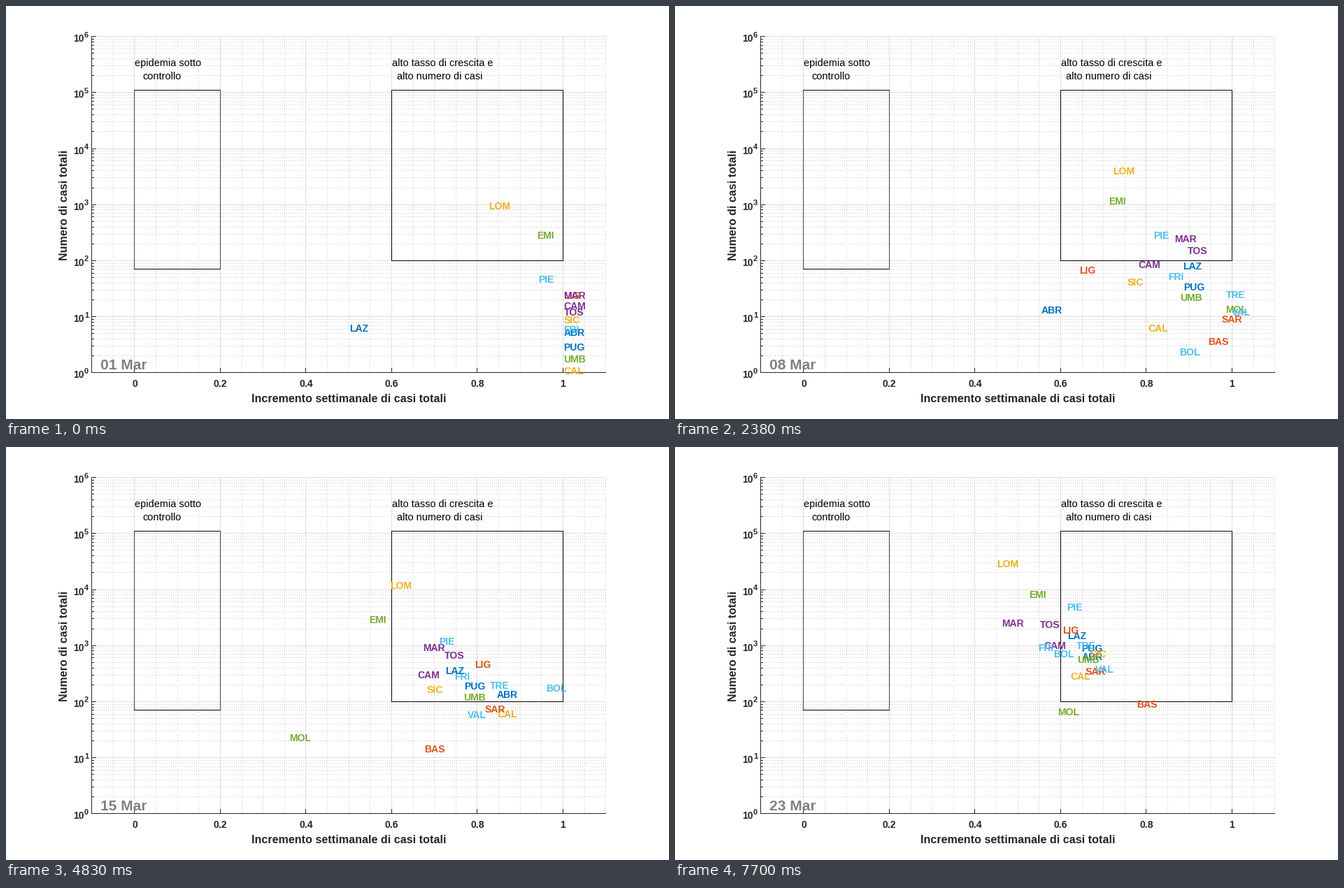
Recreate the animation shown at these times as a matplotlib script. Size 948 by 591 pixels, loop 8 s.

```python
import numpy as np
import matplotlib.pyplot as plt
from matplotlib.animation import FuncAnimation
from matplotlib.collections import LineCollection

W, H, DPI = 948, 591, 64
PX = 72 / DPI               # points per pixel
INTERVAL, LOOP = 20, 8000
STEP_MS, LAST_STEP = 70, 110
STEPS_PER_DAY = 5
LAG = 6 * STEPS_PER_DAY     # window of the growth rate

LEFT, RIGHT, TOP, BOTTOM = 122.7, 857.7, 43.6, 524.8
DECADE = (BOTTOM - TOP) / 6

BLUE, ORANGE, YELLOW = "#0072BD", "#D95319", "#EDB120"
PURPLE, GREEN, SKY = "#7E2F8E", "#77AC30", "#4DBEEE"
DARK = "#262626"

plt.rcParams["font.family"] = "Liberation Sans"

fig = plt.figure(figsize=(W / DPI, H / DPI), dpi=DPI, facecolor="white")
ax = fig.add_axes([0, 0, 1, 1])
ax.set_xlim(0, W)
ax.set_ylim(H, 0)
ax.axis("off")


def px_x(v):
    return 183.9 + 612.5 * v


def px_y(v):
    return BOTTOM - DECADE * np.log10(v)


def lines(segs, color, z=1, dotted=False):
    """One-pixel lines through pixel centres."""
    ax.add_collection(LineCollection(
        np.floor(segs) + 0.5, colors=color, linewidths=PX, zorder=z,
        linestyles=(0.5, (1, 2)) if dotted else "solid",
        capstyle="butt" if dotted else "projecting", snap=False))


def write(x, y, s, size=14, color=DARK, weight="bold", **kw):
    return ax.text(x, y, s, fontsize=size * PX, color=color, weight=weight,
                   va="baseline", **kw)


def vline(x, y0=TOP, y1=BOTTOM):
    return [(x, y0), (x, y1)]


def hline(y, x0=LEFT, x1=RIGHT):
    return [(x0, y), (x1, y)]


def draw_axes():
    major_x = [px_x(0.2 * k) for k in range(6)]
    minor_x = [px_x(0.05 * k) for k in range(-1, 23) if k % 4]
    major_y = [px_y(10.0 ** k) for k in range(7)]
    minor_y = [px_y(m * 10.0 ** k) for k in range(6) for m in range(2, 10)]

    lines([vline(x) for x in minor_x] + [hline(y) for y in minor_y],
          "#c9c9c9", dotted=True)
    lines([vline(x) for x in major_x] + [hline(y) for y in major_y[1:]],
          "#dedede", 2)

    ticks = [vline(x, BOTTOM - 6, BOTTOM) for x in major_x]
    ticks += [hline(y, LEFT, LEFT + 6) for y in major_y]
    ticks += [hline(y, LEFT, LEFT + 3) for y in minor_y]
    lines(ticks + [vline(LEFT), hline(BOTTOM)], DARK, 3)

    for k, x in enumerate(major_x):
        write(x, 545, f"{0.2 * k:.1g}", ha="center")
    for k, y in enumerate(major_y):
        write(96.5, y + 7.5, "10")
        write(112, y + 1, str(k), 11)
    write(490, 567, "Incremento settimanale di casi totali", 16.1, ha="center")
    write(88.5, 285, "Numero di casi totali", 16, ha="center", rotation=90,
          rotation_mode="anchor")


def draw_zone(v0, v1, y0, y1, side):
    x0, x1 = px_x(v0), px_x(v1)
    lines([vline(x0, y0, y1), vline(x1, y0, y1)], side, 4)
    lines([hline(y0, x0, x1), hline(y1, x0, x1)], "black", 4)


def note(x, y, s):
    write(x, y, s, 14.5, "black", "normal")


draw_axes()
draw_zone(0, 0.2, px_y(1.1e5), px_y(70), "#444444")
draw_zone(0.6, 1, px_y(1.1e5), px_y(100), "black")
note(184.5, 86, "epidemia sotto")
note(195.5, 105, "controllo")
note(552.5, 86, "alto tasso di crescita e")
note(559, 105, "alto numero di casi")
date = write(135, 519.5, "01 Mar", 21, "#808080", zorder=5)

KEYS = (0, 17, 34, 49, 82, 110)


class Region:
    """Heights at the key steps give the cases; growth follows from them."""

    def __init__(self, name, color, growth, *heights, first=1):
        self.label = write(0, 0, name, 14, color, zorder=6)
        self.heights = heights
        self.early = (first, growth, self.rate(LAG))

    def height(self, step):
        return np.interp(step, KEYS, self.heights)

    def rate(self, step):
        return 1 - 10 ** ((self.height(step) - self.height(step - LAG)) / DECADE)

    def place(self, step):
        y = self.height(step)
        v = (self.rate(step) if step > LAG
             else np.interp(step, (0, KEYS[1], LAG), self.early))
        self.label.set_position((px_x(v) + 1, y + 5))
        self.label.set_visible(y < BOTTOM)      # at least one case


regions = [
    Region("ABR", BLUE, .88, 467, 450, 435, 387, 333, 300),
    Region("BAS", ORANGE, 1, 600, 514, 480, 454, 418, 368),
    Region("CAL", YELLOW, .81, 522, 503, 461, 420, 358, 328),
    Region("CAM", PURPLE, .905, 429, 402, 370, 351, 310, 284),
    Region("EMI", GREEN, .81, 328, 303, 279, 266, 235, 211, first=.937),
    Region("FRI", SKY, 1, 463, 420, 387, 353, 312, 287),
    Region("LAZ", BLUE, .92, 461, 401, 372, 352, 300, 270, first=.5),
    Region("LIG", ORANGE, .265, 414, 413, 378, 343, 291, 262),
    Region("LOM", YELLOW, .785, 286, 262, 236, 216, 186, 167, first=.825),
    Region("MAR", PURPLE, .96, 414, 365, 333, 312, 271, 252),
    Region("MOL", GREEN, 1, 610, 461, 434, 428, 409, 379),
    Region("BOL", SKY, .975, 600, 462, 495, 379, 323, 296),
    Region("PIE", SKY, .945, 391, 373, 328, 308, 259, 229, first=.94),
    Region("PUG", BLUE, .865, 488, 444, 402, 374, 321, 288),
    Region("SAR", ORANGE, 1, 600, 499, 448, 406, 355, 321),
    Region("SIC", YELLOW, .76, 449, 427, 395, 371, 332, 296),
    Region("TOS", PURPLE, .915, 438, 396, 350, 326, 279, 254),
    Region("TRE", SKY, 1, 580, 488, 413, 382, 315, 284),
    Region("UMB", GREEN, 1, 505, 442, 417, 391, 336, 304),
    Region("VAL", SKY, 1, 700, 530, 438, 428, 353, 318),
]


def update(i):
    step = min(LAST_STEP, (i * INTERVAL + INTERVAL // 2) // STEP_MS)
    date.set_text(f"{1 - (-step // STEPS_PER_DAY):02d} Mar")
    for region in regions:
        region.place(step)
    return [date] + [region.label for region in regions]


anim = FuncAnimation(fig, update, frames=LOOP // INTERVAL, interval=INTERVAL,
                     init_func=lambda: update(0), repeat=True, repeat_delay=0,
                     blit=False)
plt.show()
```
